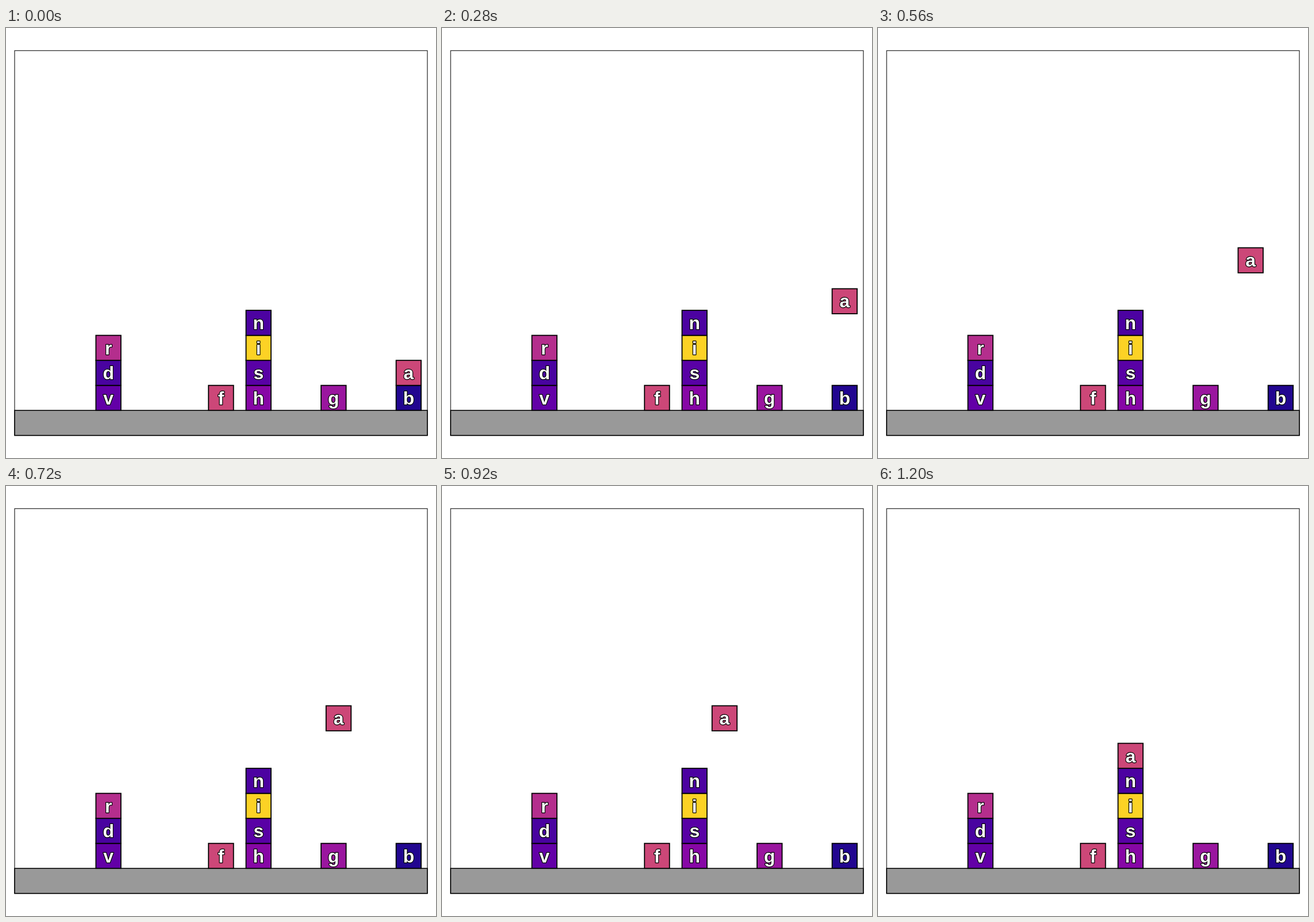
These frames come from a looping animation (748 px wide and 748 px high, 1240 ms). An HTML page:

```html
<!DOCTYPE html>
<html lang="en">
<head>
<meta charset="utf-8">
<title>Stacking blocks</title>
<style>
  html, body { margin: 0; height: 100%; overflow: hidden; background: #fff; }
  svg { display: block; width: 100vw; height: 100vh; }
  rect { stroke: #000; stroke-width: 1.8; }
  .frame { fill: none; stroke: #333; stroke-width: 1.3; }
  .ground { fill: #999; stroke-width: 1.6; }
  text {
    font: bold 32px "Liberation Sans", Arial, sans-serif;
    text-anchor: middle;
    fill: #fff;
    stroke: #000;
    stroke-width: 2.4;
    stroke-linejoin: round;
    paint-order: stroke;
  }
</style>
</head>
<body>
<svg viewBox="0 0 748 748">
  <rect class="frame" x="15" y="39.4" width="718" height="669.2"/>
  <rect class="ground" x="15" y="665.2" width="718" height="43.5"/>
</svg>
<script>
const UNIT = 43.52, FLOOR = 665.2, CENTER = 374;
const STEP = 40, LOOP = 1240;
const svg = document.querySelector('svg');

// Stacks from bottom to top, by horizontal offset in units.
const stacks = [
  [-4.5, { v: '#6300a7', d: '#4903a0', r: '#b42e8d' }],
  [0, { f: '#cc4778' }],
  [1.5, { h: '#8707a6', s: '#5901a5', i: '#fcd225', n: '#4c02a1' }],
  [4.5, { g: '#9a169f' }],
  [7.5, { b: '#220690', a: '#cc4778' }],
];

function place(block, column, level) {
  const x = CENTER + column * UNIT, y = FLOOR - (level + 0.5) * UNIT;
  block.setAttribute('transform', `translate(${x} ${y})`);
}

const blocks = {};
for (const [column, stack] of stacks) {
  Object.entries(stack).forEach(([letter, color], level) => {
    const block = document.createElementNS(svg.namespaceURI, 'g');
    block.innerHTML = `<rect x="${-UNIT / 2}" y="${-UNIT / 2}" width="${UNIT}" height="${UNIT}" fill="${color}"/>
      <text y="11.2">${letter}</text>`;
    place(block, column, level);
    svg.append(block);
    blocks[letter] = block;
  });
}

const progress = (t, from, to) => Math.min(1, Math.max(0, (t - from) / (to - from)));

// Lift, carry left, then lower onto the tall stack.
function draw(now) {
  const t = Math.floor((now % LOOP) / STEP) * STEP;
  const column = 7.5 - 6 * progress(t, 440, 1040);
  const level = 1 + 4.5 * progress(t, 0, 440) - 1.5 * progress(t, 1040, 1200);
  place(blocks.a, column, level);
  requestAnimationFrame(draw);
}
draw(performance.now());
</script>
</body>
</html>
```
